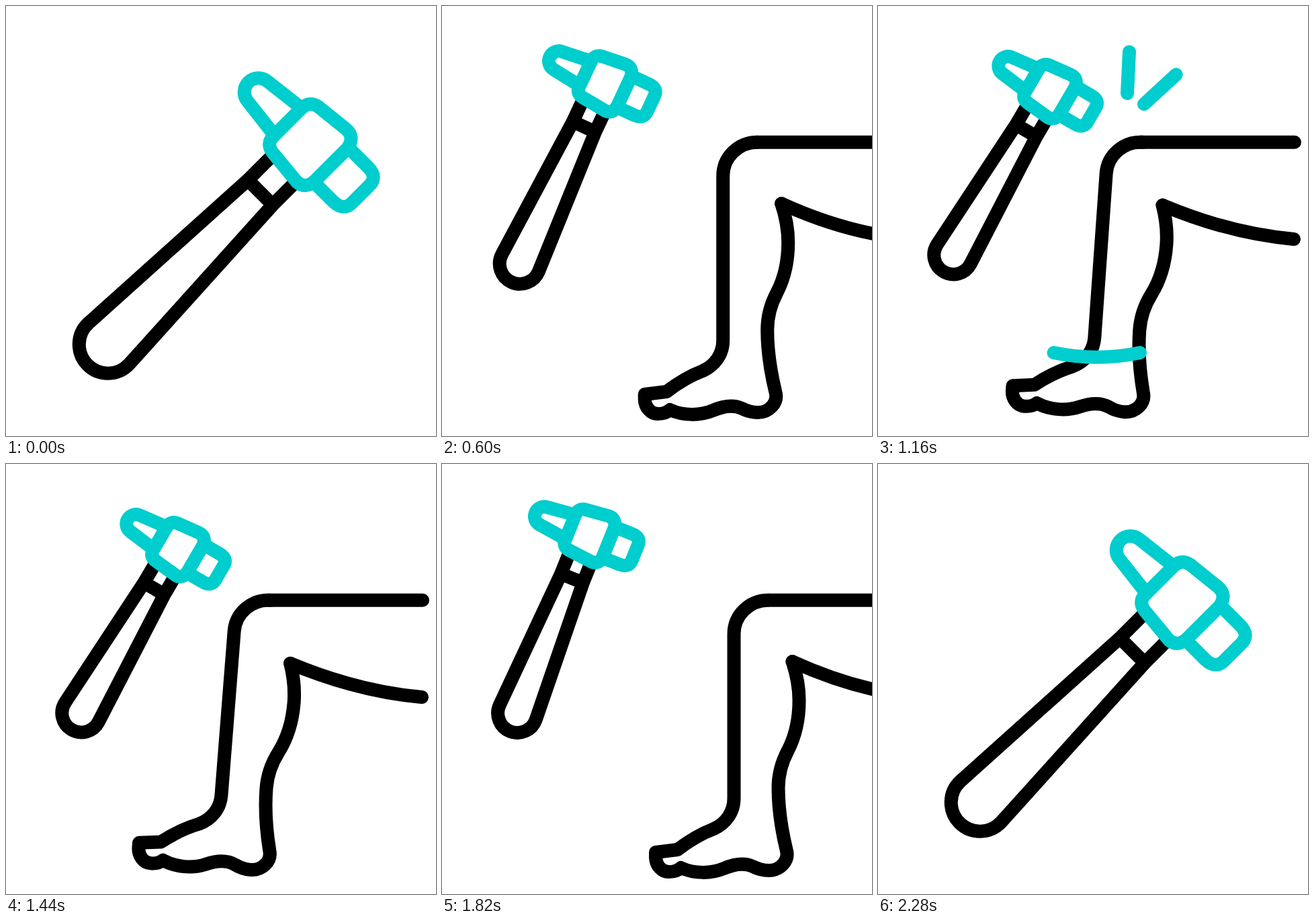
These frames come from a looping animation (640 px wide and 640 px high, 2400 ms). An HTML page without scripts:

```html
<!DOCTYPE html>
<html lang="en">
<head>
<meta charset="utf-8">
<title>Knee reflex</title>
<style>
@property --s { syntax: "<number>"; inherits: true; initial-value: 1; }

html, body { margin: 0; width: 100%; height: 100%; overflow: hidden; background: #fff; }
svg { display: block; width: 100vw; height: 100vh; }
path { fill: none; stroke: #000; stroke-linejoin: round; }
.cyan path { stroke: #00cdcd; }

.hammer, .leg, .shin, .thigh, .hit { animation: 2400ms linear infinite; }

/* the outline keeps its weight while the hammer shrinks */
.hammer {
  scale: var(--s);
  stroke-width: calc(20px / var(--s));
  animation-name: move, size, swing;
}
@keyframes move {
  0%, 5% { translate: 151.5px 504px; animation-timing-function: cubic-bezier(.52,0,.68,1); }
  29.167% { translate: 112px 370.8px; }
  75% { translate: 112px 370.8px; animation-timing-function: cubic-bezier(.5,0,.6,1); }
  95%, 100% { translate: 151.5px 504px; }
}
@keyframes size {
  0%, 5% { --s: 1; animation-timing-function: cubic-bezier(.45,0,.7,1); }
  29.167% { --s: .67; }
  73.333% { --s: .67; animation-timing-function: cubic-bezier(.5,0,.6,1); }
  95%, 100% { --s: 1; }
}
@keyframes swing {
  0%, 5% { rotate: 0deg; animation-timing-function: cubic-bezier(.66,0,.65,1); }
  30% { rotate: -23.1deg; animation-timing-function: cubic-bezier(.4,0,.6,1); }
  41.667% { rotate: -14.7deg; }
  60% { rotate: -14.7deg; animation-timing-function: cubic-bezier(.33,0,.67,1); }
  72.5% { rotate: -23.1deg; }
  75% { rotate: -23.1deg; animation-timing-function: cubic-bezier(.5,0,.6,1); }
  95%, 100% { rotate: 0deg; }
}

.leg { stroke-width: 20px; stroke-linecap: round; animation-name: slide; }
@keyframes slide {
  0%, 5% { translate: 360.5px 0; animation-timing-function: cubic-bezier(.275,0,.635,1); }
  33.333% { translate: -79.5px 0; }
  66.667% { translate: -79.5px 0; animation-timing-function: cubic-bezier(.365,0,.725,1); }
  95%, 100% { translate: 360.5px 0; }
}

.shin { transform-origin: 470px 253px; animation-name: kick; }
@keyframes kick {
  0%, 41.667% { rotate: 0deg; animation-timing-function: cubic-bezier(.33,0,.67,1); }
  50% { rotate: 4.5deg; }
  60% { rotate: 4.5deg; animation-timing-function: cubic-bezier(.33,0,.67,1); }
  70%, 100% { rotate: 0deg; }
}
.thigh { animation-name: bend; }
@keyframes bend {
  0%, 41.667% { d: path("M506 294C563 320 630 341 698.5 347"); animation-timing-function: cubic-bezier(.33,0,.67,1); }
  50% { d: path("M502.7 296.7C561 321 630 341 698.5 347"); }
  60% { d: path("M502.7 296.7C561 321 630 341 698.5 347"); animation-timing-function: cubic-bezier(.33,0,.67,1); }
  70%, 100% { d: path("M506 294C563 320 630 341 698.5 347"); }
}

.hit {
  stroke-width: 20px;
  stroke-linecap: round;
  stroke-dasharray: 1 3;
  animation-name: draw, show;
}
@keyframes draw {
  0%, 41.667% { stroke-dashoffset: 1; animation-timing-function: cubic-bezier(.33,0,.67,1); }
  51.667% { stroke-dashoffset: 0; animation-timing-function: cubic-bezier(.33,0,.67,1); }
  59.167%, 100% { stroke-dashoffset: -1; }
}
@keyframes show {
  0%, 100% { opacity: 0; animation-timing-function: step-end; }
  42% { opacity: 1; animation-timing-function: step-end; }
  59% { opacity: 0; animation-timing-function: step-end; }
}
</style>
</head>
<body>
<svg viewBox="0 0 640 640">
  <g class="leg">
    <path d="M699.5 202.700H470"/>
    <path class="thigh" d="M506 294C563 320 630 341 698.5 347"/>
    <path class="shin" d="M470 202.700A51 50.300 0 0 0 419 253V498C419 518 407 535 389 543C368 551 352 561 335 574L302.500 578V586C303 597 311 607 322 607C330 607 336 605 340 601C360 610 385 610 404 602C418 596 434 593 447 599C455 603 462 605 471 605C487 605 502 591 497 574C490 545 485 515 485 482C485 462 490 444 499 427C510 406 516 380 516 352C516 331 512 312 506 294"/>
  </g>

  <g class="hammer">
    <g transform="translate(-151.5 -504)">
      <path d="M395 224L360 259L122.800 472A43 43 0 1 0 183.500 532.800L397 296L428 265M360 259L397 296"/>
      <g class="cyan">
        <path d="M436 149L389 112A21 21 0 0 0 359 141L396 188"/>
        <path d="M514 215L539 240Q554 255 540 268L516 292Q503 306 487 291L463 267"/>
        <path d="M397 195L440 152Q452 141 465 150L506 183Q520 195 508 212L460 260Q446 273 433 262L400 222Q386 207 397 195Z"/>
      </g>
    </g>
  </g>

  <g class="cyan">
    <path class="hit" pathLength="1" d="M371 130L375 47"/>
    <path class="hit" pathLength="1" d="M396 146L460 87"/>
    <path class="hit" pathLength="1" d="M390 516A314.600 314.600 0 0 1 219 504"/>
  </g>
</svg>
</body>
</html>
```
